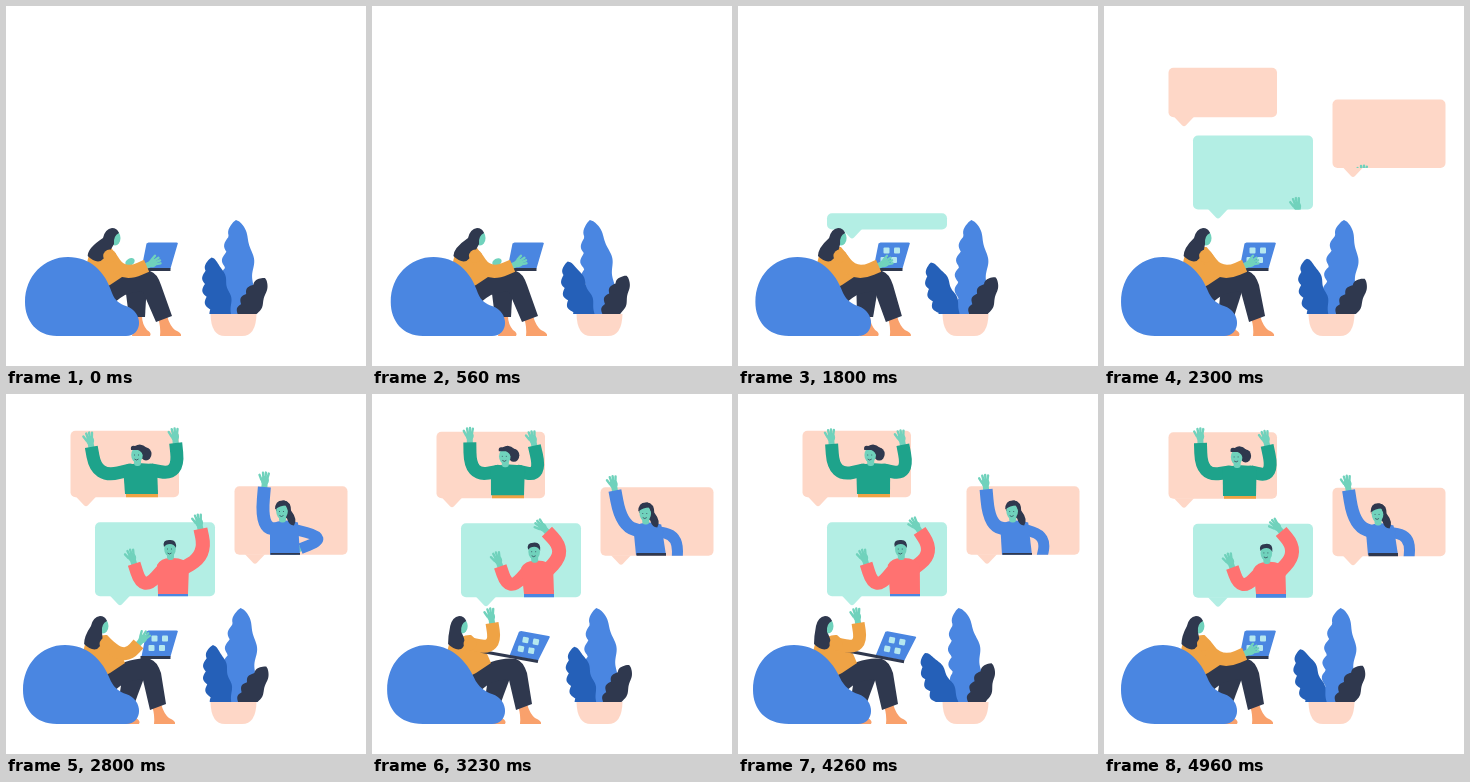
An HTML page with a canvas that plays this animation: 360 px wide and 360 px high, repeating every 5 s.

```html
<!DOCTYPE html>
<html>
<head>
<meta charset="utf-8">
<style>
html, body { margin: 0; width: 100%; height: 100%; overflow: hidden; background: #fff; }
canvas { display: block; width: 360px; height: 360px; }
</style>
</head>
<body>
<canvas id="stage" width="360" height="360"></canvas>
<script>
const LOOP = 5000, GREET = 2800;
const c = document.getElementById('stage').getContext('2d');
const BLUE = '#4a86e1', NAVY = '#2f384e', DEEP = '#2560b8', ORANGE = '#efa345', FOOT = '#f9a16c',
  SKIN = '#70d2bc', MINT = '#b3eee4', PEACH = '#fed7c7', GREEN = '#1ea38b', RED = '#ff7271';

const wave = (t, peak, period) => Math.cos(2 * Math.PI * (t - peak) / period);
const mix = (a, b, u) => a.map((v, i) => v + (b[i] - v) * u);

function ease(t, start, length) {
  const u = Math.min(1, Math.max(0, (t - start) / length));
  return u * u * (3 - 2 * u);
}

function shape(color, d) {
  c.fillStyle = color;
  c.fill(new Path2D(d));
}

function line(color, width, d, cap = 'butt') {
  c.strokeStyle = color;
  c.lineWidth = width;
  c.lineCap = cap;
  c.stroke(new Path2D(d));
}

function oval(color, x, y, rx, ry = rx, turn = 0) {
  c.fillStyle = color;
  c.beginPath();
  c.ellipse(x, y, rx, ry, turn, 0, 7);
  c.fill();
}

function box(color, x, y, w, h, r = 0) {
  c.fillStyle = color;
  c.beginPath();
  c.roundRect(x, y, w, h, r);
  c.fill();
}

function hand(x, y, angle) {
  c.save();
  c.translate(x, y);
  c.rotate(angle);
  line(SKIN, 6, 'M-9 0H0');
  for (const a of [-.9, -.35, .05, .45])
    line(SKIN, 2.4, `M0 ${a * 4}L${7.5 * Math.cos(a)} ${7.5 * Math.sin(a)}`, 'round');
  oval(SKIN, -.5, 0, 4.5, 4);
  c.restore();
}

// Sleeve from shoulder round the elbow to the wrist, then the hand.
function arm(color, w, sx, sy, ex, ey, hx, hy) {
  const angle = Math.atan2(hy - ey, hx - ex);
  const wx = hx - 7 * Math.cos(angle), wy = hy - 7 * Math.sin(angle);
  hand(hx, hy, angle);
  const [ax, ay] = mix([sx, sy], [ex, ey], .35), [bx, by] = mix([ex, ey], [wx, wy], .7);
  line(color, w, `M${sx} ${sy}L${ax} ${ay}Q${ex} ${ey} ${bx} ${by}L${wx} ${wy}`);
  oval(color, sx, sy, w / 2);
}

// Leaf along a bent spine: scalloped on the left, softly waved on the right.
function leaf(color, bx, by, tx, ty, width, bend, lobes) {
  const left = [], right = [], n = 60;
  for (let i = 0; i <= n; i++) {
    const s = i / n;
    const x = bx + (tx - bx + bend) * s - bend * s * s, y = by + (ty - by) * s;
    const dx = tx - bx + bend - 2 * bend * s, dy = ty - by, len = Math.hypot(dx, dy);
    const w = width * Math.pow(4 * s * (1 - s), .6);
    const l = w * (.8 + .26 * Math.abs(Math.sin(lobes * Math.PI * s)));
    const r = w * (.97 + .09 * Math.sin(lobes * Math.PI * s));
    left.push([x + dy / len * l, y - dx / len * l]);
    right.unshift([x - dy / len * r, y + dx / len * r]);
  }
  c.fillStyle = color;
  c.beginPath();
  for (const p of left.concat(right)) c.lineTo(...p);
  c.fill();
}

function plant(t) {
  const sway = peak => wave(t, peak, 3000);
  const main = 228 + 12 * sway(2330), side = 197 + 10 * sway(2750), dark = 257 + 4 * sway(2500);
  leaf(BLUE, 228, 325, main, 214, 16, 12, 7);
  leaf(DEEP, 221, 326, side, 255 - 4 * sway(2750), 13, -10, 6);
  leaf(NAVY, 234, 322, dark, 271 + 2 * sway(2500), 11, -5, 5);
  shape('#fff', 'M195 308H265V335H195Z');
  shape(PEACH, 'M204.5 308H250.5Q250 330 236 330H219Q205 330 204.5 308Z');
}

function laptop(t, tilt) {
  c.save();
  c.translate(149.5 + tilt * 2, 262.5 + tilt * 1.5);
  c.rotate(tilt * .19);
  shape(BLUE, 'M-7-26H21Q23-26 22-24L15 0H-14L-9-25Z');
  line(NAVY, 3, `M${-15 - 30 * tilt} 1H15`);
  const size = 6 * ease(t, 1350, 250);
  for (const row of [0, 1])
    for (const col of [0, 1])
      box('#b5e8ef', -1 - 3 * row + 10.5 * col - size / 2, -18 + 9.5 * row - size / 2, size, size, size / 6);
  c.restore();
}

function worker(t) {
  const lift = ease(t, 2600, 500) - ease(t, 4350, 550);
  const tilt = ease(t, 2850, 450) - ease(t, 4350, 500);
  const head = 106 - 7 * ease(t, 0, 2400) - 12 * ease(t, 2400, 900) + 5 * ease(t, 4400, 600);
  const low = 85 + (head - 87) * .3;
  const tuck = ease(t, 1200, 1500), front = -6 * tuck, back = -11 * tuck;
  const lean = 2 * ease(t, 0, 2500) + 2 * tilt;
  const typing = Math.sin(t / 45) * .8 * (1 - ease(t, 1500, 300));

  // far leg, near leg
  shape(FOOT, `M${127 + back} 310h9q0 8 5 14q5 3 3 6h-18q2-8 1-20Z`);
  shape(NAVY, `M118 272L141 276L${139 + back} 311H${123 + back}Z`);
  shape(FOOT, `M${152 + front} 312l9-2q3 10 8 14q7 3 6 6h-21q1-9-2-18Z`);
  shape(NAVY, `M98 290V279Q124 262 144 265Q151 267 155 279L${166 + front} 310L${150 + front} 316L137 286Q122 284 108 297Z`);

  // body, head
  shape(ORANGE, `M${low - 8} 250Q${low + 6} 240 ${low + 14} 241Q113 252 119 269L104 279L92 285L${low - 11} 262Z`);
  oval(SKIN, head + 3, 232, 5.5, 7.5);
  shape(NAVY, `M${head + 7} 227Q${head + 5} 222 ${head} 222Q${head - 7} 223 ${head - 9} 232
    Q${low - 9} 242 ${low - 9} 250Q${low - 2} 257 ${low + 4} 255Q${low + 11} 250 ${head + 2} 238
    Q${head + 1} 230 ${head + 7} 227Z`);

  // bean bag
  const left = 19 - lean, top = 62 - 1.5 * lean;
  shape(BLUE, `M51 330C${left + 12} 330 ${left} 315 ${left} 296C${left} 270 ${top - 24} 251 ${top} 251
    C${top + 22} 251 ${99 - 1.2 * lean} 265 ${106 - .6 * lean} 287C109 295 114 298 120 300C138 306 137 330 120 330Z`);

  laptop(t, tilt);
  if (t < 1700) oval(SKIN, 124 + (106 - head), 256 - typing, 5, 3.5, -.5);
  const [ex, ey, hx, hy] = mix([117, 270, 147, 257 + typing], [124, 255, 119, 222], lift);
  arm(ORANGE, 13, low + 13, 250, ex, ey, hx, hy);
}

function bubble(t, color, x, y, w, h, tip, start) {
  const p = ease(t, start, 450);
  if (!p) return;
  const bottom = y + h + 26 * (1 - p), tall = h * p;
  box(color, x, bottom - tall, w, tall, Math.min(5, tall / 2));
  shape(color, `M${tip - 10} ${bottom - .5}h20l-8 ${Math.min(9.5, tall) - 1}q-2 2-4 0Z`);
}

// Slides a figure up from behind the lower edge of its bubble.
function rise(t, start, bottom, draw) {
  const p = ease(t, start, 400);
  if (!p) return;
  c.save();
  c.beginPath();
  c.rect(0, 0, 360, bottom);
  c.clip();
  c.translate(0, 85 * (1 - p));
  draw();
  c.restore();
}

function face(x, y) {
  box(SKIN, x - 3, y + 3, 7, 8, 3);
  oval(SKIN, x, y, 5.8, 7.8);
  line(NAVY, .7, `M${x - 3} ${y}h1M${x + 1} ${y}h1M${x - 2.5} ${y + 4}q2 2 4 0`);
}

function man(swing, open) {
  const x = 162 + 2 * open, y = 157 - 2 * swing;
  const [ex, ey, hx, hy] = mix([193, 157, 168, 133], [200, 161, 193, 128], open);
  box(BLUE, 152, 196, 30, 8);
  arm(RED, 13, x - 6, y + 19, 137, 198, 126, y + 8);
  arm(RED, 14, x + 12, y + 20, ex, ey, hx, hy);
  shape(RED, `M152 200L${x - 13} ${y + 16}Q${x - 9} ${y + 9} ${x} ${y + 9}Q${x + 15} ${y + 8} ${x + 19} ${y + 17}L182 200Z`);
  face(x, y);
  shape(NAVY, `M${x - 6} ${y - 2}Q${x - 8} ${y - 9} ${x - 1} ${y - 9}Q${x + 7} ${y - 10} ${x + 6} ${y - 1}Q${x + 4} ${y - 5} ${x} ${y - 5}Q${x - 4} ${y - 5} ${x - 6} ${y - 2}Z`);
}

function cheerer(swing, open) {
  const x = 135 - 2 * open, y = 61 - swing;
  const [ax, ay, lx, ly, ex, hx, hy] = mix([99, 82, 99, 41, 169, 160, 45], [91, 84, 84, 46, 173, 169, 42], open);
  box(ORANGE, 120, y + 36, 32, 12);
  arm(GREEN, 13, x - 9, y + 16, ax, ay, lx, ly);
  arm(GREEN, 13, x + 12, y + 16, ex, y + 21, hx, hy);
  shape(GREEN, `M${x - 16} ${y + 12}Q${x} ${y + 7} ${x + 18} ${y + 11}L152 ${y + 40}H119Z`);
  oval(NAVY, x + 7, y, 5.5, 6.5);
  face(x - 2, y + 1);
  shape(NAVY, `M${x - 8} ${y - 4}Q${x - 9} ${y - 9} ${x - 4} ${y - 8}Q${x + 2} ${y - 12} ${x + 8} ${y - 6}L${x + 5} ${y + 4}Q${x + 3} ${y - 3} ${x - 1} ${y - 4}Z`);
}

function greeter(swing, open) {
  const x = 274 + 3 * open, y = 118 - 1.5 * swing;
  const [ax, ay, hx, hy] = mix([249, 131, 240, 90], [255, 133, 259, 86], open);
  const [ex, ey, px, py] = mix([306, 142, 305, 173], [322, 144, 288, 157], open * open);
  arm(BLUE, 11, x + 12, y + 19, ex, ey, px, py);
  arm(BLUE, 13, x - 5, y + 19, ax, ay, hx, hy);
  shape(BLUE, `M${x - 13} ${y + 14}Q${x} ${y + 7} ${x + 15} ${y + 12}L294 161H264Z`);
  box(NAVY, 264.5, 159, 29.5, 4);
  shape(NAVY, `M${x - 7} ${y}Q${x - 7} ${y - 10} ${x + 1} ${y - 10}Q${x + 8} ${y - 9} ${x + 8} ${y}Q${x + 15} ${y + 9} ${x + 11} ${y + 15}Q${x + 6} ${y + 15} ${x + 4} ${y + 8}Z`);
  face(x - 1, y + 1);
  shape(NAVY, `M${x - 8} ${y - 1}Q${x - 8} ${y - 11} ${x + 1} ${y - 10}Q${x + 8} ${y - 9} ${x + 7} ${y + 4}Q${x + 4} ${y - 2} ${x + 3} ${y - 5}Q${x - 3} ${y - 5} ${x - 8} ${y - 1}Z`);
}

function frame(now) {
  const t = now % LOOP;
  const swing = wave(t, GREET, 1400);
  // Arms start wide open, then settle in a fading swing.
  const since = Math.max(0, t - GREET);
  const open = .25 + .75 * Math.exp(-since / 900) * wave(since, 0, 1400);
  const bob = -.8 * swing;

  c.fillStyle = '#fff';
  c.fillRect(0, 0, 360, 360);
  plant(t);
  bubble(t, PEACH, 64.5, 37.5 + bob, 108.5, 66.5, 80, 2000);
  bubble(t, PEACH, 228.5, 93 + bob, 113, 68.5, 249, 1830);
  bubble(t, MINT, 89, 129 + bob, 120, 74, 114, 1665);
  rise(t, 2350, 104 + bob, () => cheerer(swing, open));
  rise(t, 2250, 161.5 + bob, () => greeter(swing, open));
  rise(t, 2200, 203 + bob, () => man(swing, open));
  worker(t);
  requestAnimationFrame(frame);
}

const begin = performance.now();
requestAnimationFrame(now => frame(Math.max(0, now - begin)));
</script>
</body>
</html>
```
